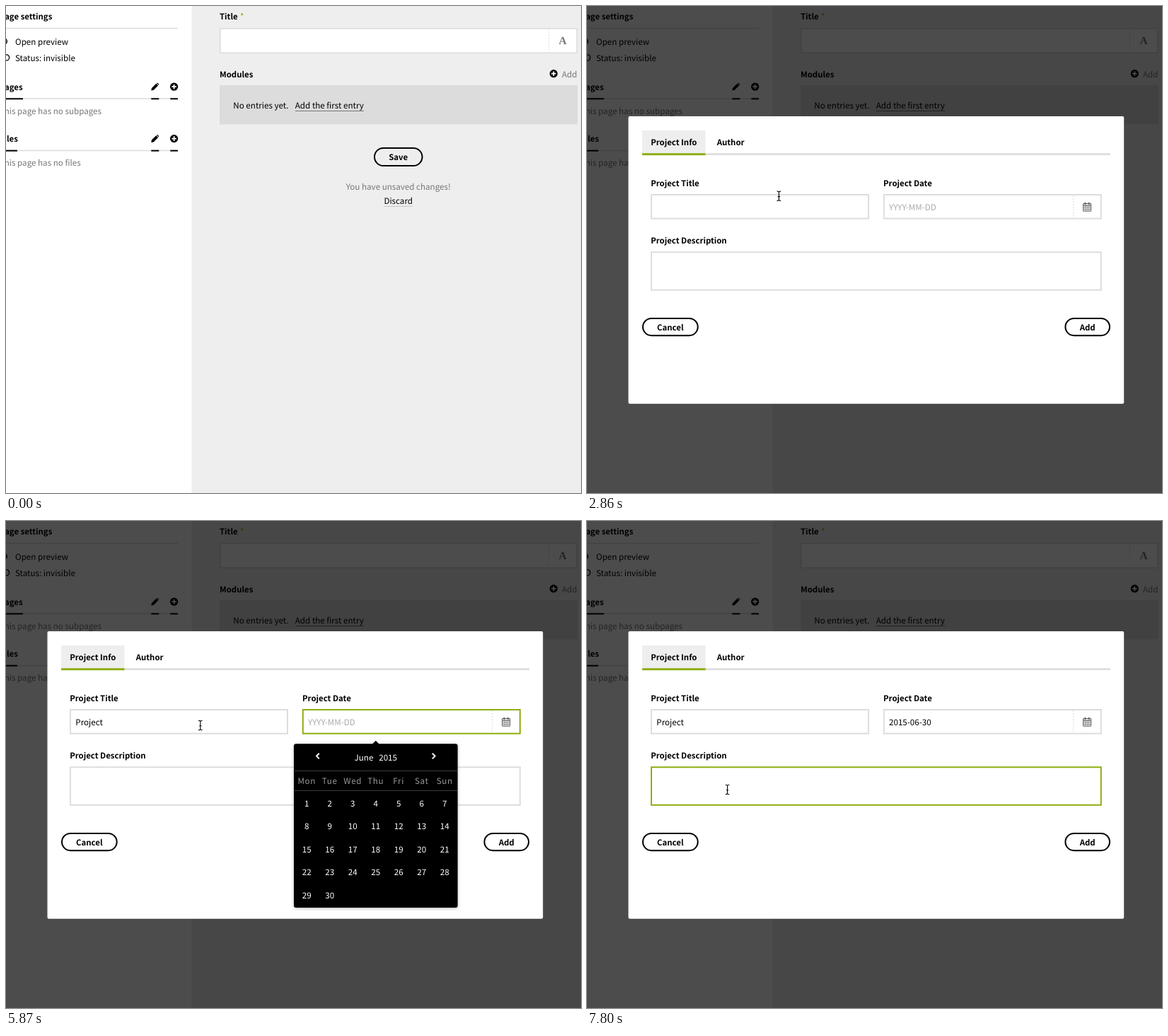
An HTML page that plays this animation: 813x689 px, repeating every 8000 ms.

```html
<!DOCTYPE html>
<html lang="en">
<head>
<meta charset="utf-8">
<title>Adding a structured entry</title>
<style>
  html, body { margin: 0; width: 100%; height: 100%; overflow: hidden; background: #eee; }
  svg { display: block; width: 100vw; height: 100vh; }
  text {
    font: 11.63px "Noto Sans CJK SC", "Noto Sans CJK JP", "Noto Sans CJK KR", "Noto Sans", sans-serif;
    text-rendering: geometricPrecision;
    white-space: pre;
  }
  .bold { font-size: 11.4px; font-weight: 700; }
  .medium { font-weight: 500; fill: #fff; }
  .mid { text-anchor: middle; }
  .muted { fill: #777; }
  .rule { fill: #ddd; }
  .green { fill: #8dae10; }
  .field { fill: #fff; stroke: #ddd; stroke-width: 2; }
  .field.focus { stroke: #8dae10; }
  .button { fill: none; stroke: #000; stroke-width: 2; }
  .dash { stroke: #ddd; stroke-dasharray: 2 2; }
  .weekday { fill: #999; letter-spacing: .6px; }
  .cursor { stroke-width: 1; stroke-linejoin: round; }
</style>
</head>
<body>
<svg viewBox="0 0 813 689" preserveAspectRatio="none">
  <defs>
    <path id="pencil" d="M0 11 .6 7.6 7 1.2 9.8 4 3.4 10.4ZM7.7.6Q8.6-.3 9.4.5L10.5 1.6Q11.3 2.4 10.4 3.4Z"/>
    <g id="plus">
      <circle r="5.6"/>
      <path d="M-3.3 0H3.3M0-3.3V3.3" stroke="#fff" stroke-width="1.8"/>
    </g>
    <filter id="shadow" x="-10%" y="-10%" width="120%" height="120%">
      <feDropShadow dx="0" dy="1" stdDeviation="2" flood-opacity=".3"/>
    </filter>
  </defs>

  <!-- Sidebar -->
  <rect width="813" height="689" fill="#eee"/>
  <rect width="262.5" height="689" fill="#fff"/>
  <text class="bold" x="-9" y="19.3">Page settings</text>
  <rect class="rule" y="30.8" width="243" height="1.6"/>
  <circle cx="-3" cy="50" r="4.3" fill="none" stroke="#000" stroke-width="1.5"/>
  <text x="13" y="55">Open preview</text>
  <circle cx=".4" cy="73" r="4.2" fill="none" stroke="#000" stroke-width="1.3"/>
  <text x="13" y="78">Status: invisible</text>
  <g id="sections"></g>

  <!-- Page form -->
  <text class="bold" x="302" y="19.3">Title</text>
  <text class="green" x="331" y="19.3">*</text>
  <rect class="field" x="302.8" y="31.8" width="504.5" height="34.5" style="stroke-width:1.7"/>
  <path class="dash" d="M767.5 33V66"/>
  <text class="mid muted" x="787" y="54.3" style="font:bold 15.5px 'Liberation Serif',serif">A</text>
  <text class="bold" x="302" y="101">Modules</text>
  <use href="#plus" x="774.3" y="95.7"/>
  <text class="muted" x="786" y="101">Add</text>
  <rect x="302" y="112" width="506" height="55.5" fill="#dcdcdc"/>
  <text x="321.3" y="145">No entries yet.</text>
  <text x="408.8" y="145">Add the first entry</text>
  <rect id="underline" x="409" y="148" width="97"/>
  <rect class="button" x="521" y="201" width="67.5" height="25" rx="12.5"/>
  <text class="bold mid" x="554.7" y="218">Save</text>
  <text class="mid muted" x="554.7" y="260.3">You have unsaved changes!</text>
  <text class="mid" x="554.7" y="279.8">Discard</text>
  <rect x="534.5" y="283" width="40.5" height="1" fill="#c4c4c4"/>

  <!-- Dialog -->
  <g id="dialog">
    <rect width="813" height="689" opacity=".7"/>
    <rect x="58.5" y="156" width="700.7" height="406.7" rx="2" fill="#fff"/>
    <rect x="78" y="176" width="89.5" height="33" fill="#eee"/>
    <rect class="rule" x="78" y="208.3" width="662" height="2.7"/>
    <rect class="green" x="78" y="208.3" width="89.5" height="2.9"/>
    <text class="bold" x="90.2" y="196.7">Project Info</text>
    <text class="bold" x="183.8" y="196.7">Author</text>
    <text class="bold" x="90.2" y="254.7">Project Title</text>
    <rect id="titleField" x="91" y="267" width="307" height="33.7"/>
    <text id="titleText" x="98.3" y="288.7"></text>
    <text class="bold" x="419" y="254.7">Project Date</text>
    <rect id="dateField" x="419.8" y="267" width="307" height="33.7"/>
    <path class="dash" d="M687.5 268V300"/>
    <text id="dateText" x="427" y="288.7"></text>
    <g fill="none" stroke="#666">
      <rect x="701.6" y="279.6" width="11" height="10.6" rx=".8" stroke-width="1.1"/>
      <path d="M704.4 277.8V281.3M709.8 277.8V281.3" stroke-width="1.8"/>
      <path d="M701.6 282.4H712.6" stroke-width="1.2"/>
      <path d="M701.6 285H712.6M701.6 287.6H712.6M704.4 282V290M707.1 282V290M709.8 282V290" stroke-width=".7"/>
    </g>
    <text class="bold" x="90.2" y="335.8">Project Description</text>
    <rect id="descField" x="91" y="348.3" width="635.8" height="53.5"/>
    <rect id="caret" width="1" height="16"/>
    <rect class="button" x="79" y="442" width="77.7" height="24.2" rx="12.1"/>
    <text class="bold mid" x="117.8" y="458.5">Cancel</text>
    <rect class="button" x="676.4" y="442" width="62.6" height="24.2" rx="12.1"/>
    <text class="bold mid" x="707.7" y="458.5">Add</text>
  </g>

  <!-- Date picker -->
  <g id="picker">
    <path d="M517.5 316 522.8 310.8 528 316Z"/>
    <rect x="407" y="315.3" width="231.6" height="231.7" rx="3" filter="url(#shadow)"/>
    <path d="M442.8 328.8 439.1 332.6 442.8 336.4M602.8 328.8 606.5 332.6 602.8 336.4"
          fill="none" stroke="#fff" stroke-width="2"/>
    <text class="medium" x="492.6" y="338.6">June</text>
    <text class="medium" x="527.2" y="338.6">2015</text>
    <path d="M408 353.5H638M408 381.5H638" stroke="#3c3c3c"/>
    <circle id="picked" class="green" cx="457.6" cy="529" r="13"/>
    <g id="days"></g>
  </g>

  <!-- Pointers, each with its hotspot at 0,0 -->
  <g id="pointer">
    <path id="arrow" class="cursor" fill="#000" stroke="#fff"
          d="M0 0V12L2.8 9.5 4.7 14 6.7 13.1 4.8 8.8H8.6Z"/>
    <path id="hand" class="cursor" fill="#fff" stroke="#000"
          d="M-1.6 1Q-1.4-.5 0 0 .8.3 1 1.5L1.8 5Q3.2 4 4 5.4 5.2 4.6 5.8 6.1 7.2 5.8 7.3 7.5 7.5 10 6.2 12V14.3H-.2Q-.8 12.3-2.4 10.8-4.3 8.5-4.4 7.4-3.8 6.2-2.2 7.4L-.4 8.6Z"/>
    <g id="beam" fill="none">
      <path d="M-2.8-6.8Q0-6.8 0-5V5Q0 6.8-2.8 6.8M2.8-6.8Q0-6.8 0-5M2.8 6.8Q0 6.8 0 5M-1.6.8H1.6"
            stroke="#000" stroke-width="1.1"/>
    </g>
  </g>
</svg>

<script>
const $ = id => document.getElementById(id);
const DURATION = 8000;

function section(title, note, y, titleEnd) {
  const bar = (x, width) => `<rect x="${x}" y="${y + 11.7}" width="${width}" height="2"/>`;
  return `<text class="bold" x="-9.2" y="${y}">${title}</text>
    <rect class="rule" y="${y + 11.7}" width="243" height="1.6"/>
    ${bar(0, titleEnd)}${bar(205.3, 11)}${bar(232.3, 10.7)}
    <use href="#pencil" x="205.3" y="${y - 10}"/><use href="#plus" x="237.6" y="${y - 4.4}"/>
    <text class="muted" x="-9.2" y="${y + 34.4}">${note}</text>`;
}
$('sections').innerHTML =
  section('Pages', 'This page has no subpages', 118.6, 24) +
  section('Files', 'This page has no files', 192, 16);

const column = i => 425.2 + 32.5 * i;
const weekdays = ['Mon', 'Tue', 'Wed', 'Thu', 'Fri', 'Sat', 'Sun'];
$('days').innerHTML =
  weekdays.map((name, i) => `<text class="weekday mid" x="${column(i)}" y="372.4">${name}</text>`).join('') +
  Array.from({ length: 30 }, (_, i) =>
    `<text id="day${i + 1}" class="medium mid" x="${column(i % 7)}" y="${403.7 + 32.55 * Math.floor(i / 7)}">${i + 1}</text>`
  ).join('');

// Pointer moves: start, end, number of steps, path
const moves = [
  [590, 1380, 10, 'M463 624C560 520 540 300 465 150'],
  [1470, 1560, 2, 'M465 150L466 145'],
  [2330, 3030, 9, 'M466 145C400 170 300 250 244 288'],
  [3210, 3570, 5, 'M244 288C238 310 241 310 247 291'],
  [5870, 6650, 10, 'M247 291C500 270 768 330 768 430C768 560 640 579 597 575S430 590 459 531'],
  [6740, 7440, 9, 'M459 531C400 470 260 420 198.5 380'],
].map(([start, end, steps, d]) => {
  const path = document.createElementNS('http://www.w3.org/2000/svg', 'path');
  path.setAttribute('d', d);
  return { start, end, steps, path, length: path.getTotalLength() };
});

function pointerAt(t) {
  const move = moves.filter(m => t >= m.start).pop();
  if (!move) return moves[0].path.getPointAtLength(0);
  const interval = (move.end - move.start) / (move.steps - 1);
  const done = Math.min(1, (Math.floor((t - move.start) / interval + .001) + 1) / move.steps);
  return move.path.getPointAtLength(move.length * done * done * (3 - 2 * done));
}

const between = (v, low, high) => v >= low && v < high;

function pointerKind(t, { x, y }) {
  if (between(t, 1470, 2330) || between(t, 6640, 6740)) return 'hand';
  if (t < 2330) return 'arrow';
  const overInput = between(y, 266, 302) && (between(x, 90, 399) || between(x, 419, 688));
  const overText = t >= 6740 && between(y, 347, 403) && between(x, 90, 728);
  return overInput || overText ? 'beam' : 'arrow';
}

const keyTimes = [4110, 4370, 4460, 4730, 4900, 5170, 5250];
const show = (id, visible) => { $(id).style.display = visible ? '' : 'none'; };
const focusField = (id, focused) => $(id).setAttribute('class', focused ? 'field focus' : 'field');

function render(t) {
  const hovered = between(t, 1470, 2330);
  $('underline').setAttribute('height', hovered ? 1.7 : 1);
  $('underline').setAttribute('fill', hovered ? '#000' : '#777');

  show('dialog', t >= 2090);
  const typing = between(t, 3030, 5520);
  const describing = t >= 7440;
  focusField('titleField', typing);
  focusField('dateField', between(t, 5520, 6640));
  focusField('descField', describing);

  $('titleText').textContent = 'Project'.slice(0, keyTimes.filter(k => t >= k).length);
  const picked = t >= 6640;
  $('dateText').textContent = picked ? '2015-06-30' : 'YYYY-MM-DD';
  $('dateText').setAttribute('fill', picked ? '#000' : '#aaa');

  show('caret', between(t, 3030, 3570) || between(t, 4020, 5520) || between(t, 7440, 7800));
  $('caret').setAttribute('x', 98.2 + (typing ? $('titleText').getComputedTextLength() : 0));
  $('caret').setAttribute('y', describing ? 357 : 276);

  show('picker', between(t, 5520, 6740));
  show('picked', picked);
  $('day30').style.fill = picked ? '#000' : '#fff';

  const point = pointerAt(t);
  const kind = pointerKind(t, point);
  show('pointer', t >= 440);
  $('pointer').setAttribute('transform', `translate(${point.x} ${point.y})`);
  for (const id of ['arrow', 'hand', 'beam']) show(id, id === kind);
}

const began = performance.now();
function tick() {
  render((performance.now() - began) % DURATION);
  requestAnimationFrame(tick);
}
tick();
</script>
</body>
</html>
```
